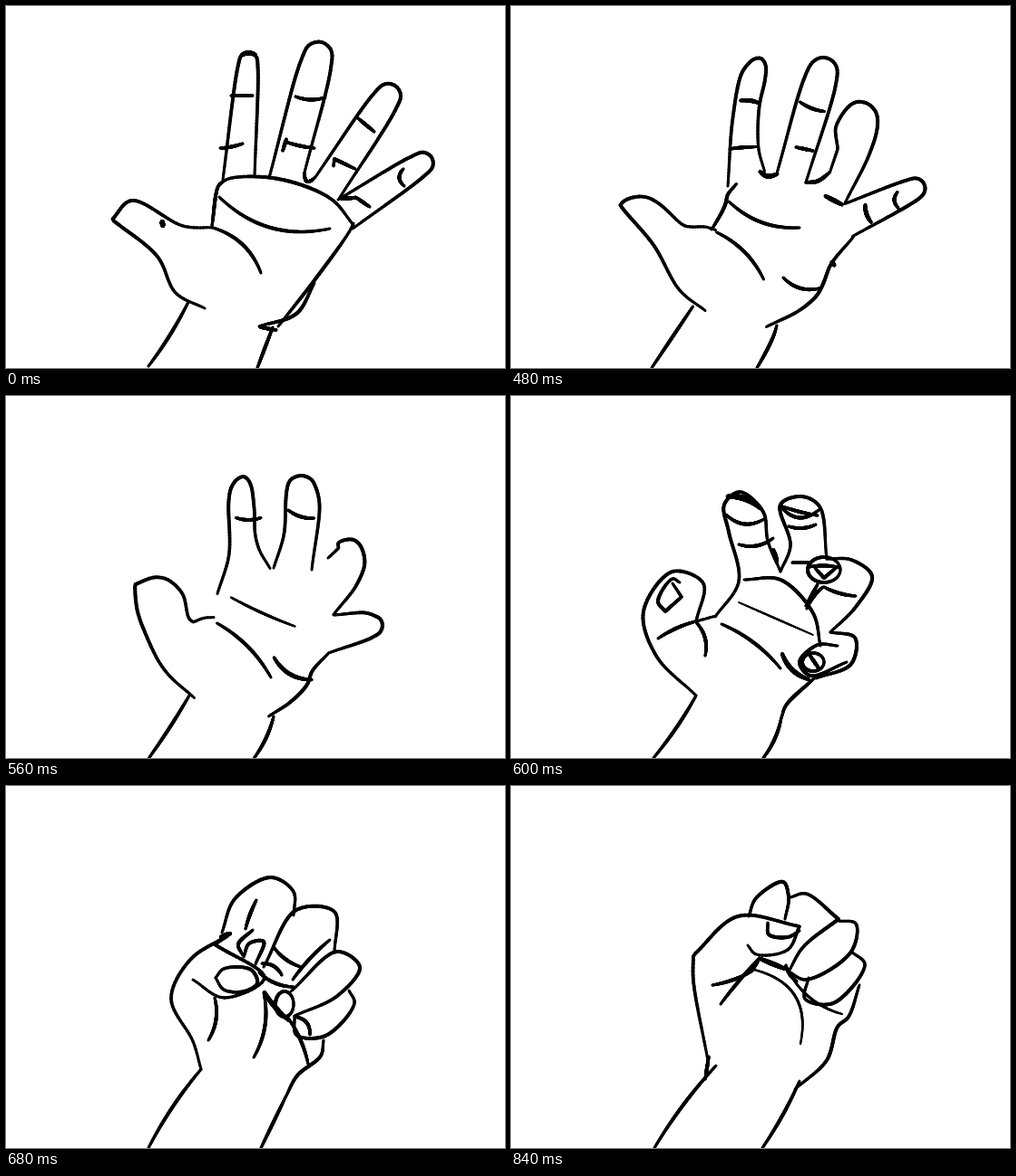
An HTML page with a canvas that plays this animation: 550x400 px, repeating every 1.28 s.

```html
<!DOCTYPE html>
<html lang="en">
<head>
<meta charset="utf-8">
<title>Closing hand</title>
<style>
html, body { margin: 0; width: 100%; height: 100%; overflow: hidden; background: #fff; }
canvas { display: block; width: 550px; height: 400px; }
</style>
</head>
<body>
<canvas id="stage" width="550" height="400"></canvas>
<script>
const STEP = 40, HOLD = 440, LOOP = 1280, INK = 3.7, N = 80;
const ctx = document.getElementById('stage').getContext('2d');
ctx.lineCap = 'round';

const mix = (a, b, u) => a + (b - a) * u;
const blend = (p, q, u) => [mix(p[0], q[0], u), mix(p[1], q[1], u)];
const dist = (p, q) => Math.hypot(p[0] - q[0], p[1] - q[1]);

// Even spacing along a line, so that any two strokes can be blended
function even(line) {
  const len = [0];
  line.slice(1).forEach((p, i) => len.push(len[i] + dist(line[i], p)));
  const total = len[len.length - 1];
  let j = 1;
  return Array.from({ length: N + 1 }, (_, i) => {
    const at = total * i / N;
    while (j < line.length - 1 && len[j] < at) j++;
    return blend(line[j - 1], line[j], (at - len[j - 1]) / (len[j] - len[j - 1] || 1));
  });
}

// Centripetal spline; a repeated point makes a corner
function spline(p) {
  const out = [p[0]], gap = (a, b) => a && b ? Math.sqrt(dist(a, b)) : 0;
  for (let i = 0; i + 1 < p.length; i++) {
    const [z, a, b, c] = [p[i - 1], p[i], p[i + 1], p[i + 2]];
    const d0 = gap(z, a), d = gap(a, b), d2 = gap(b, c);
    if (!d) continue;
    const slope = (l, m, r, dl, dr, k) =>
      d * ((m[k] - l[k]) / dl - (r[k] - l[k]) / (dl + dr) + (r[k] - m[k]) / dr);
    for (let s = 1; s <= 24; s++) {
      const u = s / 24, v = u * u, w = v * u;
      out.push([0, 1].map(k => {
        const m = d0 ? slope(z, a, b, d0, d, k) : b[k] - a[k];
        const n = d2 ? slope(a, b, c, d, d2, k) : b[k] - a[k];
        return (2 * w - 3 * v + 1) * a[k] + (w - 2 * v + u) * m + (3 * v - 2 * w) * b[k] + (w - v) * n;
      }));
    }
  }
  return out;
}

const stroke = (line, weight = INK) => ({ line: even(line), weight });

function path(...xy) {
  const pts = [];
  for (let i = 0; i < xy.length; i += 2) pts.push([xy[i], xy[i + 1]]);
  return stroke(spline(pts));
}

// A bow from one point to another; bulge is to the right of the direction of travel
function arc(x1, y1, x2, y2, bulge = 0, weight = INK) {
  const dx = x2 - x1, dy = y2 - y1, d = Math.hypot(dx, dy);
  return stroke(Array.from({ length: 25 }, (_, i) => {
    const u = i / 24, h = 4 * u * (1 - u) * bulge / d;
    return [x1 + dx * u - dy * h, y1 + dy * u + dx * h];
  }), weight);
}

function oval(x, y, rx, ry, tilt = 0) {
  const c = Math.cos(tilt), s = Math.sin(tilt);
  return stroke(Array.from({ length: 49 }, (_, i) => {
    const a = i * Math.PI / 24, p = rx * Math.cos(a), q = ry * Math.sin(a);
    return [x + p * c - q * s, y + p * s + q * c];
  }));
}

// Straight finger from one side of its base, round the tip, to the other side
function finger(ax, ay, tx, ty, bx, by, r) {
  const dx = tx - (ax + bx) / 2, dy = ty - (ay + by) / 2, d = Math.hypot(dx, dy);
  const at = (back, side) => [tx + (dy * side - dx * back) * r / d, ty - (dx * side + dy * back) * r / d];
  return stroke(spline([[ax, ay], at(1.5, 1), at(0.35, 0.72), [tx, ty], at(0.35, -0.72), at(1.5, -1), [bx, by]]));
}

// Strokes sharing a name in neighbouring poses move into each other
const poses = [
  {
    index: finger(239, 192, 268, 51, 274, 188, 11), tip: arc(260, 54, 275, 54, -2, 5),
    middle: finger(290, 190, 348, 40, 329, 184, 17), gap: arc(329, 184, 341, 189, 8),
    ring: finger(341, 189, 429, 88, 367, 213, 15),
    pinky: finger(366, 214, 469, 167, 382, 246, 13),
    thumb: path(219, 334, 187, 317, 167, 277, 117, 236, 117, 236, 138, 215, 195, 243, 228, 245),
    web: arc(228, 245, 281, 295, -9), arc: arc(235, 211, 357, 246, 17),
    side: path(227, 243, 234, 199, 240, 193), base: path(234, 199, 245, 191, 300, 191, 358, 213, 383, 242),
    heel: path(383, 240, 378, 250, 340, 303, 300, 354), heelEdge: path(340, 306, 320, 340, 279, 354),
    heelEnd: arc(280, 355, 298, 358),
    wristL: arc(201, 327, 157, 398, -2), wristR: arc(294, 355, 277, 400),
    iA: arc(248, 99, 272, 99), iB: arc(236, 157, 261, 152, 1),
    mA: arc(319, 100, 352, 101, 3), mB: arc(308, 150, 340, 157, 1), mC: arc(309, 147, 305, 160),
    rA: arc(388, 124, 406, 139), rB: path(361, 177, 362, 169, 362, 169, 385, 180),
    pA: arc(438, 180, 439, 199, 5), pB: arc(385, 211, 401, 222), pC: arc(369, 213, 386, 212),
    dot: arc(172, 238, 173, 243, 0, 5)
  },
  {
    index: finger(237, 205, 269, 51, 274, 178, 13), side: arc(223, 249, 237, 205, 4),
    gapA: arc(274, 178, 293, 184, 8),
    middle: finger(293, 184, 352, 51, 324, 186, 17), gap: arc(324, 186, 341, 189, 9),
    ring: finger(341, 189, 399, 82, 366, 214, 18),
    pinky: finger(366, 214, 460, 177, 375, 254, 13), tip: arc(447, 178, 461, 180, -2, 7),
    thumb: path(217, 337, 190, 318, 160, 273, 114, 226, 125, 215, 158, 215, 219, 249),
    pad: arc(207, 249, 242, 250, -2, 5), web: arc(220, 250, 270, 283, -6),
    arc: arc(235, 215, 332, 245, 15),
    heel: path(377, 255, 342, 300, 333, 320, 282, 357),
    wristL: arc(201, 333, 152, 400), wristR: path(294, 353, 291, 364, 273, 400),
    iA: arc(250, 104, 275, 103, -3, 5), iB: arc(243, 159, 270, 154, -1), iC: arc(243, 194, 262, 187),
    mA: arc(321, 104, 348, 105, 1), mB: arc(310, 152, 332, 158, 1),
    mC: arc(290, 191, 320, 199, 0, 5), rC: arc(334, 205, 360, 215, 0, 5),
    rA: arc(376, 132, 405, 137, -5), rB: arc(362, 176, 379, 181),
    pA: arc(433, 190, 436, 209, 2), pB: arc(394, 215, 404, 232, 0, 5), pC: arc(370, 225, 377, 240),
    fold: arc(308, 307, 338, 309, 4), dot: arc(357, 270, 361, 272)
  },
  {
    index: path(241, 193, 243, 120, 258, 69, 284, 64, 281, 88, 268, 120, 270, 165, 285, 187),
    gapA: arc(275, 188, 294, 187, 0, 6),
    middle: finger(293, 186, 345, 63, 326, 204, 18), gap: arc(326, 204, 362, 178, 0, 4.5),
    ring: path(362, 178, 369, 157, 369, 157, 354, 141, 372, 125, 400, 150, 396, 180, 370, 222),
    knuckle: arc(367, 157, 383, 158), bend: arc(362, 177, 372, 188, 3),
    ringNail: path(366, 128, 375, 139, 375, 139, 384, 130),
    pinky: finger(370, 223, 451, 217, 378, 255, 12),
    thumb: path(211, 336, 182, 310, 155, 255, 124, 208, 124, 208, 162, 210, 195, 256, 220, 245, 232, 246),
    web: arc(233, 250, 287, 321, -7), arc: arc(245, 217, 304, 245, 3),
    side: path(219, 245, 238, 212, 242, 198, 260, 188),
    heel: path(378, 255, 353, 285, 348, 310, 320, 338, 281, 352),
    fold: arc(292, 293, 346, 314, 9), heelFold: arc(337, 272, 360, 270, 3), dot: arc(350, 296, 352, 301, 0, 5),
    wristL: arc(200, 331, 158, 400), wristR: arc(292, 353, 269, 400, -2),
    iA: arc(256, 105, 273, 112), iB: arc(239, 157, 271, 157),
    mA: arc(316, 108, 343, 128, 3), mB: arc(318, 160, 334, 162, -1),
    rC: arc(359, 215, 370, 224, 0, 4.5), pA: arc(419, 221, 418, 238, 6), pB: arc(387, 224, 390, 246, 4)
  },
  {
    index: path(225, 244, 251, 205, 240, 150, 235, 120, 252, 106, 278, 128, 283, 160, 297, 194),
    cap: arc(239, 111, 275, 124, -4, 6), joint: arc(237, 131, 279, 136, 8),
    middle: path(297, 194, 308, 165, 297, 120, 320, 111, 340, 122, 348, 180),
    midTip: arc(298, 123, 339, 126, 10), midNail: arc(299, 122, 338, 132, 1),
    iA: arc(251, 164, 289, 157, 5), crease: arc(289, 170, 293, 183, 0, 5), mA: arc(306, 144, 336, 142, 3),
    ring: path(348, 180, 375, 181, 398, 199, 380, 233, 352, 261), ringTip: oval(345, 192, 18, 14),
    ringBase: arc(310, 184, 328, 184), ringFold: arc(328, 189, 363, 190, -2),
    nailV: path(335, 190, 345, 201, 345, 201, 358, 190), bendLine: arc(345, 211, 380, 221, 2),
    rodA: arc(325, 232, 338, 208), rodB: arc(344, 211, 326, 235, 2),
    pinky: path(352, 261, 379, 267, 375, 296, 336, 312), pinkyTip: path(360, 276, 338, 275, 318, 294, 330, 309, 370, 294),
    pinkyNail: oval(333, 294, 12, 10), slash: arc(329, 286, 340, 302),
    base: path(257, 203, 297, 203, 333, 240, 341, 276),
    arc: arc(251, 228, 333, 264, 0, 2.2), web: arc(232, 252, 297, 301, -5), fold: arc(299, 285, 328, 313, 5, 5),
    thumb: path(204, 331, 160, 287, 146, 238, 178, 194, 212, 207, 204, 249, 204, 249, 226, 243),
    pad: arc(204, 249, 162, 268, 2), nail: path(186, 206, 178, 202, 162, 227, 170, 238, 170, 238, 188, 222, 188, 222, 178, 207),
    thumbFold: arc(204, 250, 214, 287, -5),
    heel: path(334, 312, 303, 342, 298, 356), wristL: arc(204, 331, 157, 400, -2), wristR: arc(298, 355, 278, 400, -3)
  },
  {
    index: path(238, 162, 252, 125, 292, 101, 317, 117, 317, 143),
    mark: arc(276, 126, 264, 158, 1), markB: path(272, 159, 256, 175, 261, 187),
    edge: arc(237, 167, 247, 163, 0, 5), indexNail: path(262, 189, 268, 174, 284, 172, 275, 197),
    middle: path(284, 200, 320, 137, 362, 139, 362, 184),
    mA: arc(295, 178, 325, 200, 3), mB: arc(316, 214, 357, 170, -2),
    midNail: arc(282, 196, 304, 209, -4), midTip: arc(279, 206, 317, 222, 4),
    ring: path(314, 227, 365, 183, 390, 200, 365, 232, 318, 254), ringNail: oval(307, 241, 10, 14),
    pinky: path(378, 226, 384, 240, 352, 276, 320, 275, 318, 254), pinkyNail: arc(318, 255, 335, 275, -6),
    thumb: path(215, 313, 206, 282, 182, 235, 203, 192, 245, 165, 245, 165, 230, 175, 230, 175, 285, 212, 240, 234, 206, 214),
    nail: path(231, 212, 240, 202, 270, 203, 277, 218, 262, 227, 240, 225, 231, 212),
    side: arc(230, 234, 223, 281, -5), web: arc(284, 228, 273, 300, -7),
    fold: arc(285, 228, 312, 259, 2, 5), foldEnd: arc(310, 255, 333, 307, -3),
    heel: path(350, 281, 347, 298, 321, 320, 308, 344), wristL: arc(215, 313, 157, 400, 3), wristR: arc(308, 344, 281, 400)
  },
  {
    index: path(257, 152, 270, 120, 293, 105, 314, 119),
    middle: path(299, 159, 314, 117, 345, 115, 345, 160, 318, 195, 298, 200), mark: arc(313, 122, 313, 141, 2),
    ring: path(298, 200, 312, 223, 372, 188, 380, 165, 350, 150), knob: arc(363, 193, 381, 177, 2, 5),
    pinky: path(320, 230, 378, 188, 392, 213, 328, 254, 320, 230), tuck: path(375, 233, 370, 249, 347, 250),
    thumb: path(222, 305, 195, 222, 210, 178, 255, 151, 300, 162, 308, 190, 268, 197, 242, 183),
    nail: path(265, 183, 298, 164, 308, 175, 295, 184, 265, 184),
    side: arc(222, 200, 257, 199), sideB: arc(260, 196, 226, 226, 3), sideC: arc(252, 207, 234, 229),
    web: arc(259, 198, 320, 286, -24, 2.8), palm: arc(283, 202, 292, 207),
    fold: arc(296, 204, 316, 231, 1, 4.5), foldEnd: arc(305, 214, 338, 279, -3),
    heel: path(367, 250, 360, 290, 314, 332), wristL: arc(224, 306, 158, 400), wristR: arc(314, 332, 273, 400)
  },
  {
    index: path(262, 144, 270, 124, 300, 106, 306, 124, 302, 147),
    middle: path(308, 123, 325, 119, 361, 147, 361, 147, 322, 178, 306, 205),
    ring: path(306, 205, 325, 214, 375, 183, 380, 152, 361, 149),
    pinky: path(328, 212, 324, 235, 355, 240, 390, 197, 375, 183),
    thumb: path(217, 303, 201, 215, 201, 187, 201, 187, 250, 144, 318, 155, 318, 155, 305, 181, 270, 186, 261, 176),
    nail: path(283, 151, 284, 164, 305, 167, 318, 160),
    side: arc(222, 220, 265, 205, 2), sideB: arc(274, 190, 231, 241, 1), sideC: arc(265, 205, 274, 190),
    web: arc(268, 203, 319, 285, -23, 2.8), palm: arc(275, 191, 302, 202, 0, 5),
    fold: arc(303, 198, 315, 216, 2), foldEnd: arc(306, 205, 365, 252, 8, 2.8),
    heel: path(384, 220, 372, 255, 360, 266, 348, 303, 313, 335),
    wristL: arc(226, 309, 158, 400, 3), wristTip: arc(218, 299, 214, 324), wristR: arc(318, 326, 277, 400, -2)
  }
];

// Brush pressure swells towards the middle of a stroke
function ink({ line, weight }) {
  for (let i = 1; i <= N; i++) {
    ctx.lineWidth = weight * (0.8 + 0.28 * Math.sin(Math.PI * i / N));
    ctx.beginPath();
    ctx.moveTo(...line[i - 1]);
    ctx.lineTo(...line[i]);
    ctx.stroke();
  }
}

function draw(place) {
  const from = poses[Math.floor(place)], to = poses[Math.ceil(place)], u = place % 1;
  ctx.fillStyle = '#fff';
  ctx.fillRect(0, 0, 550, 400);
  for (const name in from) {
    const a = from[name], b = to[name];
    if (b) ink({
      line: a.line.map((p, i) => blend(p, b.line[i], u)),
      weight: mix(a.weight, b.weight, u)
    });
  }
}

let shown = -1;
function tick() {
  const t = performance.now() % LOOP;
  const place = t < HOLD ? 0 : Math.min(6, 1 + Math.floor((t - HOLD) / STEP) / 2);
  if (place !== shown) draw(shown = place);
  requestAnimationFrame(tick);
}
tick();
</script>
</body>
</html>
```
